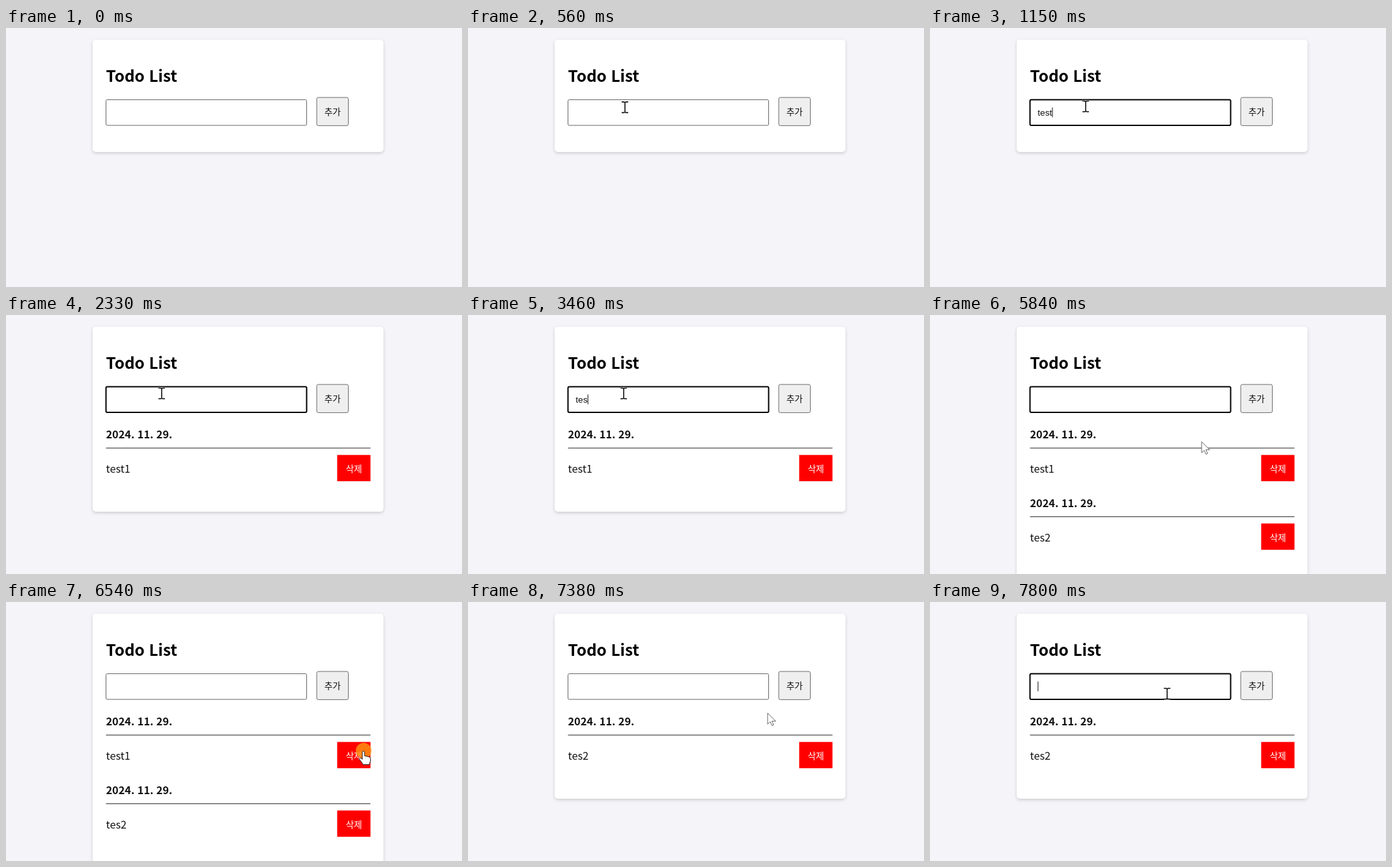
An HTML page for the animation above (8000 ms loop, 700 by 399 pixels).

```html
<!DOCTYPE html>
<html lang="ko">
<head>
<meta charset="utf-8">
<title>Todo List</title>
<style>
  html, body { margin: 0; width: 100%; height: 100%; overflow: hidden; background: #f4f4f9; }
  svg { display: block; width: 700px; height: 399px; overflow: hidden; }
  text { font: 16.3px "Noto Sans CJK KR", "Noto Sans CJK JP", "Noto Sans CJK", sans-serif; fill: #111; white-space: pre; }
  #card { fill: #fff; filter: drop-shadow(0 2px 2.5px rgba(0, 0, 0, .16)); }
  #field { fill: #fff; stroke: #666; }
  #field.focused { stroke: #000; stroke-width: 2px; }
  .title { font-size: 24.3px; font-weight: 700; fill: #000; }
  .date { font-weight: 700; }
  .label { font-size: 13.7px; text-anchor: middle; }
  .white { fill: #fff; }
  #typed { font: 13.7px "Liberation Sans", Arial, sans-serif; }
</style>
</head>
<body>
<svg viewBox="0 0 700 399">
  <rect id="card" x="133" y="18" width="446.5" height="173" rx="5"/>
  <text class="title" x="153.5" y="83.4">Todo List</text>
  <rect id="field" x="153.5" y="110.5" width="308" height="39.5" rx="2"/>
  <text id="typed" x="165.3" y="134.5"></text>
  <rect id="caret" y="122.5" width="1.1" height="15" fill="#222"/>
  <rect x="477" y="107" width="48.5" height="43.4" rx="2.5" fill="#efefef" stroke="#6b6b6b"/>
  <text class="label" x="501.3" y="134">추가</text>
  <g id="list"></g>
  <circle id="press" fill="#ff9614" fill-opacity=".8"/>
  <g id="cursor">
    <g data-kind="beam" fill="none">
      <path d="M-5-8.5H5M-5 8H5M0-8.5V8" stroke="#fff" stroke-width="3" stroke-opacity=".7"/>
      <path d="M-5-8.5H-1.5L0-7.5 1.5-8.5H5M-5 8H-1.5L0 7 1.5 8H5M0-7.5V7" stroke="#111" stroke-width="1.6"/>
    </g>
    <path data-kind="arrow" d="M0 0V17L4 13.3 6.7 19.2 9.2 18.1 6.6 12.4H12.4Z" fill="#fff" stroke="#555" stroke-width=".9"/>
    <path data-kind="hand" d="M-2 1.5a1.7 1.7 0 0 1 3.4 0V7l6.5 1.4q2.6.7 2.6 3V15l-2 5.5h-9l-5.5-7.5q-1-2 .6-2.6 1.2-.4 2.4 1l1 1z"
      fill="#fff" stroke="#222" stroke-linejoin="round"/>
  </g>
</svg>
<script>
const LOOP = 8000, PITCH = 105.6, BLINK = 560, TICK = 70, GLIDE_STEPS = 8;
const $ = id => document.getElementById(id);

// Letters come at an even gap; the closing digit follows after a pause.
const entries = [
  { text: 'test1', start: 960, gap: 63, digit: 1910, enter: 2330, removed: 6680 },
  { text: 'tes2', start: 3320, gap: 70, digit: 3810, enter: 4860, removed: LOOP }
];
const glides = [
  { start: 130, from: [405, 262], bend: [300, 165], to: [239, 121] },
  { start: 5700, from: [239, 121], bend: [371, 192], to: [549, 230] },
  { start: 7310, from: [549, 230], bend: [440, 145], to: [364, 141.5] }
];
const clicks = [{ down: 660, up: 810 }, { down: 6330, up: 6680 }, { down: 7590, up: 7730 }];

const show = (el, on) => el.setAttribute('visibility', on ? 'visible' : 'hidden');
const inside = ([x, y], l, t, r, b) => x >= l && x <= r && y >= t && y <= b;
const overField = p => inside(p, 153, 110, 462, 150);
const overDelete = p => inside(p, 508, 215, 560, 256);

function pointer(t) {
  const g = glides.findLast(g => t >= g.start);
  if (!g) return null;
  const n = Math.min(GLIDE_STEPS, Math.floor((t - g.start) / TICK) + 1);
  const rest = (1 - n / GLIDE_STEPS) ** 2, u = 1 - rest;
  return g.from.map((a, i) => rest * rest * a + 2 * u * rest * g.bend[i] + u * u * g.to[i]);
}

const lastClick = t => clicks.findLast(c => t >= c.down);

function typedText(t) {
  const e = entries.find(e => t >= e.start && t < e.enter);
  if (!e) return '';
  if (t >= e.digit) return e.text;
  return e.text.slice(0, Math.min(e.text.length - 1, Math.floor((t - e.start) / e.gap) + 1));
}

// The blink restarts on focus, after each key and shortly after Enter.
function caretOn(t, click) {
  const keys = entries.flatMap(e => {
    const letters = [...e.text].slice(1).map((_, i) => e.start + i * e.gap);
    return [...letters, e.digit, e.enter];
  });
  const last = Math.max(click.down, ...keys.filter(k => k <= t));
  const since = t - last - (entries.some(e => e.enter === last) ? 100 : 0);
  return since >= 0 && since % (2 * BLINK) < BLINK;
}

function itemMarkup({ text }, i) {
  return `<g transform="translate(0 ${i * PITCH})">
    <text class="date" x="153.5" y="190">2024. 11. 29.</text>
    <path d="M153.5 205.1H559.5" stroke="#222" stroke-width="1.03"/>
    <text x="153.5" y="243">${text}</text>
    <rect x="508.4" y="215.6" width="51.1" height="40.5" fill="#f00"/>
    <text class="label white" x="534" y="242">삭제</text>
  </g>`;
}

let shownList;
function drawList(items) {
  const key = items.map(e => e.text).join();
  if (key === shownList) return;
  shownList = key;
  $('list').innerHTML = items.map(itemMarkup).join('');
  $('card').setAttribute('height', items.length ? 179.4 + items.length * PITCH : 173);
}

function drawField(t) {
  const click = lastClick(t);
  const focused = Boolean(click) && overField(pointer(click.down));
  const typed = $('typed');
  $('field').classList.toggle('focused', focused);
  typed.textContent = typedText(t);
  $('caret').setAttribute('x', 165.3 + (typed.textContent ? typed.getComputedTextLength() : 0));
  show($('caret'), focused && caretOn(t, click));
}

function drawPointer(t) {
  const p = pointer(t), click = lastClick(t), press = $('press');
  const kind = p && (overField(p) ? 'beam' : overDelete(p) ? 'hand' : 'arrow');
  for (const el of $('cursor').children) show(el, el.dataset.kind === kind);
  show(press, click && t < click.up);
  if (!p) return;
  $('cursor').setAttribute('transform', `translate(${p})`);
  press.setAttribute('cx', p[0]);
  press.setAttribute('cy', p[1] - 1);
  press.setAttribute('r', click ? Math.min(12, 8 + (t - click.down) / 18) : 0);
}

function draw(t) {
  drawList(entries.filter(e => t >= e.enter && t < e.removed));
  drawField(t);
  drawPointer(t);
}

const begin = performance.now();
function tick() {
  draw((performance.now() - begin) % LOOP);
  requestAnimationFrame(tick);
}
tick();
</script>
</body>
</html>
```
